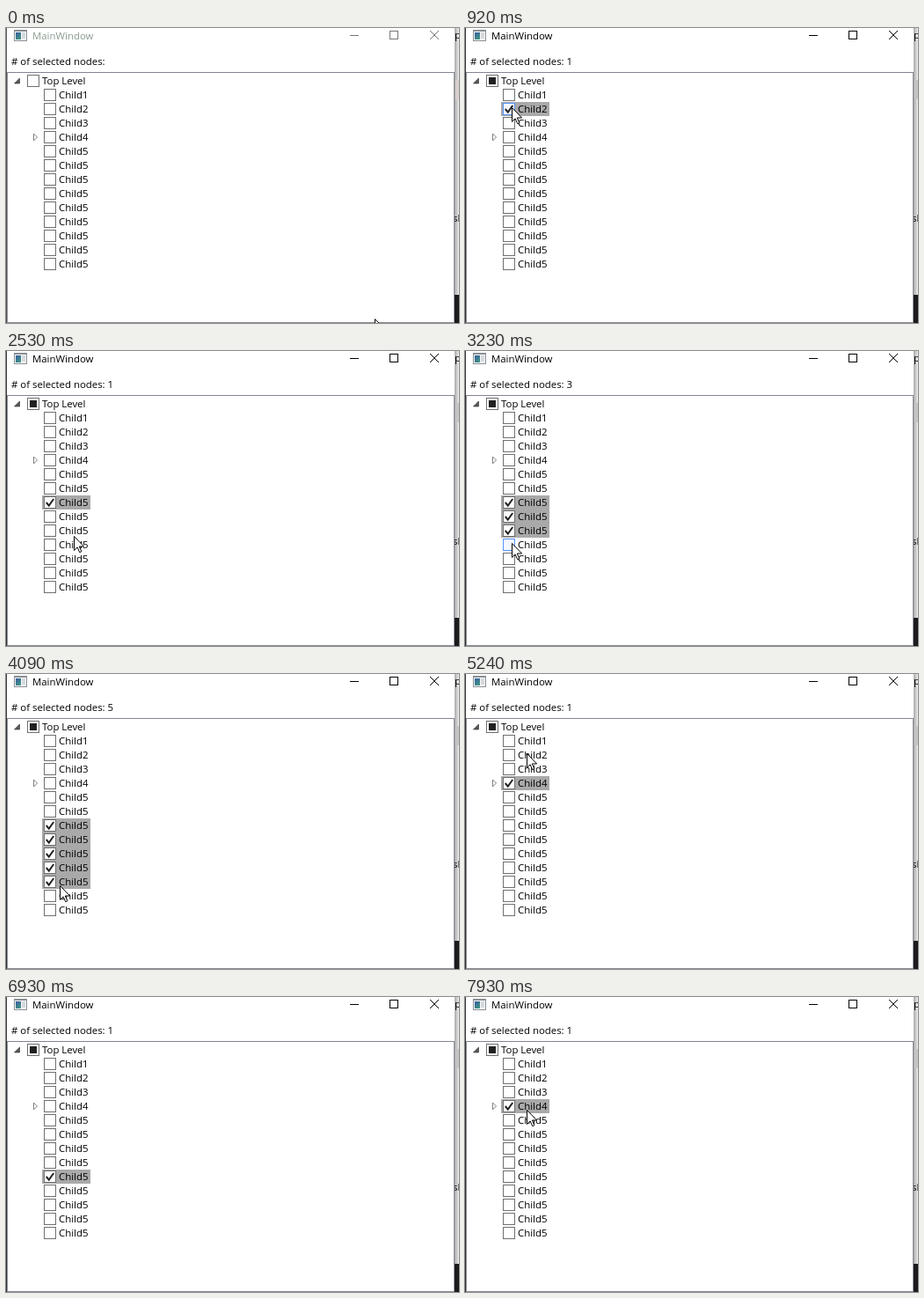
An HTML page with a canvas for the animation above (8 s loop, 515 px wide and 335 px high).

```html
<!DOCTYPE html>
<html lang="en">
<head>
<meta charset="utf-8">
<title>Tree selection</title>
<style>
html, body { margin: 0; width: 100%; height: 100%; overflow: hidden; background: #fff; }
canvas { display: block; width: 515px; height: 335px; }
</style>
</head>
<body>
<canvas id="stage" width="515" height="335"></canvas>
<script>
const ctx = document.getElementById('stage').getContext('2d');
const LOOP = 8000;
const STEP = LOOP / 104; // the picture advances in even steps
const LEAD = 12;
const ROWS = ['Top Level', 'Child1', 'Child2', 'Child3', 'Child4', ...Array(9).fill('Child5')];
const rowY = row => 60 + row * 16;

// A move glides the pointer to a spot; a click glides to a row's check box and selects a range.
const move = (start, end, x, y) => ({ start, end, x, y });
const click = (start, end, first, last = first) =>
  ({ start, end, x: 53, y: rowY(last) - 2, range: [first, last] });

const ACTIONS = [
  move(0, 150, 130, 70),
  click(300, 840, 2),
  click(1150, 1450, 2, 4),
  move(1450, 1750, 53, 136),
  move(1760, 1920, 53, 167),
  click(1990, 2150, 7),
  move(2150, 2530, 77, 210),
  click(2530, 2910, 7, 9),
  click(3160, 3300, 7, 11),
  move(3460, 3690, 61, 240),
  move(4090, 4320, 48, 225),
  click(4470, 4900, 4),
  move(4900, 5230, 70, 90),
  move(5320, 5550, 56, 134),
  click(5620, 5765, 7),
  click(5930, 6290, 9),
  move(6290, 6690, 399, 308),
  move(6780, 6920, 445, 336),
  move(7320, 7380, 347, 275),
  click(7380, 7770, 4),
  move(7770, 7920, 70, 128)
];

function stateAt(time) {
  const state = { x: 419, y: 330, range: null };
  for (const action of ACTIONS.filter(a => a.start <= time)) {
    const p = Math.min(1, (time - action.start) / (action.end - action.start));
    const eased = p * p * (3 - 2 * p);
    state.x += (action.x - state.x) * eased;
    state.y += (action.y - state.y) * eased;
    if (p === 1 && action.range) state.range = action.range;
  }
  state.x = Math.round(state.x);
  state.y = Math.round(state.y);
  return state;
}

function rect(x, y, w, h, color) {
  ctx.fillStyle = color;
  ctx.fillRect(x, y, w, h);
}

function frame(x, y, w, h, color) {
  ctx.strokeStyle = color;
  ctx.lineWidth = 1;
  ctx.strokeRect(x + 0.5, y + 0.5, w - 1, h - 1);
}

function text(value, x, y, color = '#000') {
  ctx.fillStyle = color;
  ctx.fillText(value, x, y);
}

function line(x, y, path, stroke, width = 1, fill = 'transparent') {
  ctx.save();
  ctx.translate(x, y);
  ctx.fillStyle = fill;
  ctx.strokeStyle = stroke;
  ctx.lineWidth = width;
  const shape = new Path2D(path);
  ctx.fill(shape);
  ctx.stroke(shape);
  ctx.restore();
}

function gradient(x0, y0, x1, y1, from, to) {
  const fade = ctx.createLinearGradient(x0, y0, x1, y1);
  fade.addColorStop(0, from);
  fade.addColorStop(1, to);
  return fade;
}

function drawSurroundings(active) {
  rect(510, 0, 5, 335, gradient(510, 0, 515, 0, '#a8a8a8', '#ececec'));
  rect(511, 59, 4, 22, active ? '#c4c4c4' : '#d8d0ce');
  text('p', 510, 12);
  text('sl', 508, 220);
  rect(510, 303, 5, 32, '#1c1a1c');
  rect(0, 0, 510, 335, '#fff');
  rect(0, 0, 1, 335, active ? '#333' : '#555');
}

function drawTitleBar(active) {
  const ink = active ? '#000' : '#777';
  rect(9, 2, 15, 13, '#8a8f94');
  rect(10, 4, 13, 10, '#f4f6f8');
  rect(11, 5, 6, 8, gradient(11, 5, 17, 13, '#3b5fa0', '#3d9a80'));
  rect(18, 5, 4, 7, '#d5dade');
  text('MainWindow', 30, 13, active ? '#000' : '#8b9c91');
  rect(391, 8, 10, 1, ink);
  frame(436, 3, 10, 10, ink);
  line(482, 3, 'M0 0l10 10M10 0l-10 10', ink);
}

function drawRow(label, row, selected, partial, pointer) {
  const x = row ? 43 : 24, y = rowY(row);
  const hover = pointer.x >= x && pointer.x < x + 14 && Math.abs(pointer.y - y) < 7;
  if (selected) rect(41, y - 8, 55, 16, '#a9a9a9');
  rect(x, y - 7, 14, 14, hover ? '#f3f9ff' : '#fff');
  frame(x, y - 7, 14, 14, hover ? '#5593ff' : '#707070');
  if (partial) rect(x + 3, y - 4, 8, 8, '#212121');
  if (selected) line(x, y, 'M2.8 0l3 3.6l5.4-7.6', '#212121', 2);
  text(label, x + 17, y + 4);
}

function draw(time) {
  const state = stateAt(time);
  const active = state.range !== null;
  const [first, last] = state.range || [1, 0];

  ctx.font = '11.4px "Open Sans", "Noto Sans", sans-serif';
  drawSurroundings(active);
  drawTitleBar(active);
  text('# of selected nodes: ' + (active ? last - first + 1 : ''), 6, 42);
  frame(1, 50, 509, 285, '#828790');

  line(15.5, 57, 'M0 0v6h-6z', '#262626', 0.6, '#595959');
  line(31.5, 120, 'M0 0v8l4-4z', '#818181');
  ROWS.forEach((label, row) =>
    drawRow(label, row, row >= first && row <= last, active && row === 0, state));
  line(state.x + 0.5, state.y + 0.5,
    'M0 0v16l3.6-3.6l2.6 5.8l2.2-1l-2.6-5.7h5.3z', '#000', 1, '#fff');
}

function tick() {
  const time = performance.now() % LOOP;
  draw(Math.min(LOOP - STEP, Math.floor((time + LEAD) / STEP) * STEP));
  requestAnimationFrame(tick);
}
tick();
</script>
</body>
</html>
```
